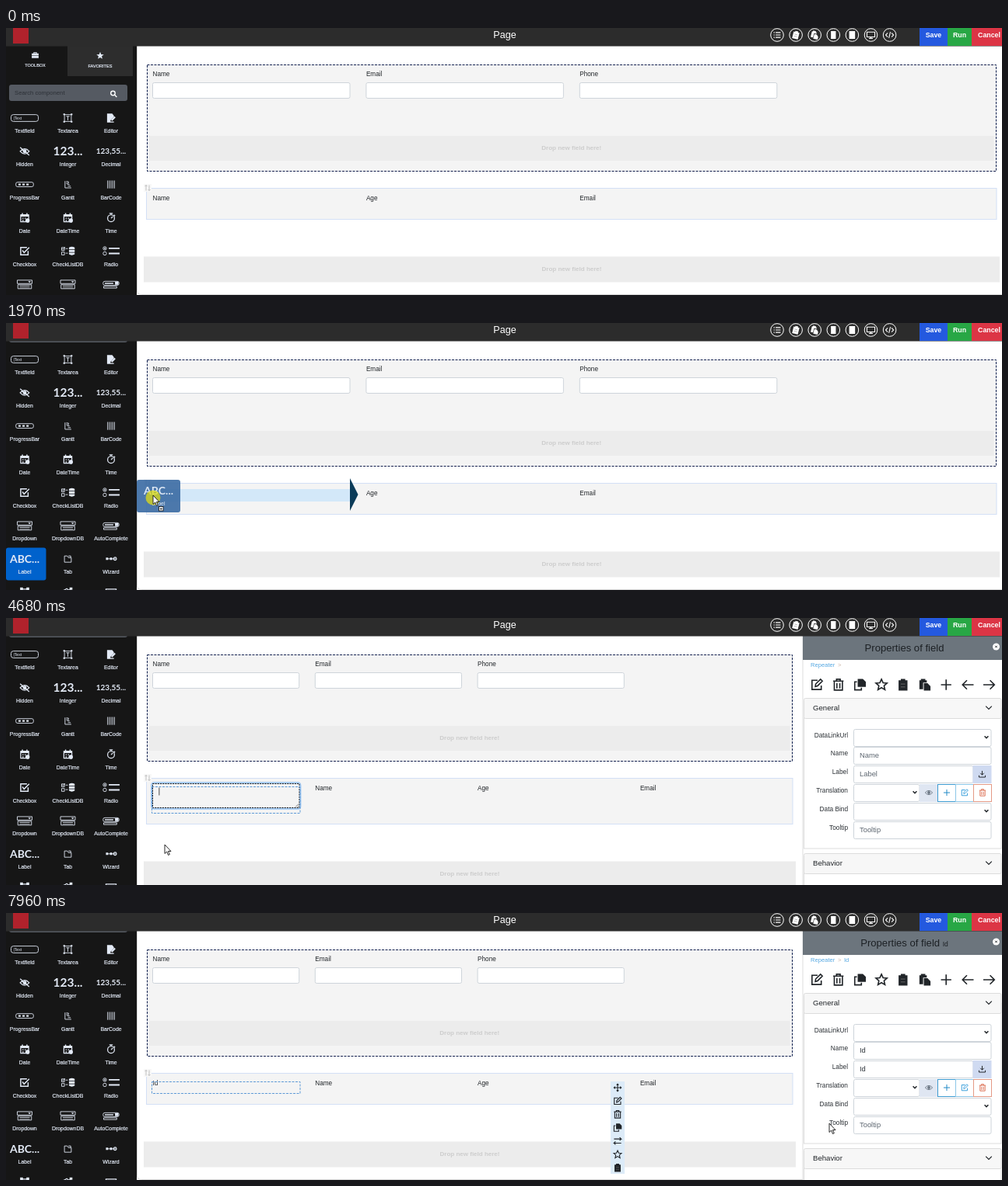
Recreate the animation shown at these times as an HTML page. Size 1280 by 344 pixels, loop 8000 ms.

```html
<!DOCTYPE html>
<html lang="en">
<head>
<meta charset="utf-8">
<title>Form builder</title>
<style>
html, body { margin: 0; width: 100%; height: 100%; overflow: hidden; background: #fff; }
svg { display: block; width: 1280px; height: 344px; font-family: "Liberation Sans", Arial, sans-serif; }
.num { font-family: Lato, sans-serif; font-weight: 700; }
</style>
</head>
<body>
<svg id="stage" viewBox="0 0 1280 344" xmlns="http://www.w3.org/2000/svg"></svg>
<script>
const LOOP = 8000;
const stage = document.getElementById('stage');
const INK = '#212529', PALE = '#e3eaf6';

const text = (x, y, s, size, fill = INK, more = '') =>
  `<text x="${x}" y="${y + size * 0.36}" font-size="${size}" fill="${fill}" ${more}>${s}</text>`;
const MID = 'text-anchor="middle"', END = 'text-anchor="end"', BOLD = 'font-weight="700"';
const FIRM = `stroke="${PALE}" stroke-width=".2"`;
// box given by its edges
const box = (x, y, r, b, fill, more = '') =>
  `<rect x="${x}" y="${y}" width="${r - x}" height="${b - y}" fill="${fill}" ${more}/>`;
const path = (d, more = '') => `<path d="${d}" ${more}/>`;
const solid = d => path(d, 'fill="currentColor" stroke="none"');
const THIN = 'stroke-width="1.200"';

const cal = path('M-7-5H7V7H-7Z') + solid('M-7-6H7V-2H-7ZM-5-8h2v3h-2ZM3-8h2v3H3ZM-4 0h2v2h-2ZM0 0h2v2H0ZM-4 4h2v2h-2Z')
  + '<circle cx="5" cy="5" r="3" fill="currentColor"/>';
const select = path('M-13-7H13V-1H-13ZM-12 1H12V8H-12Z', THIN) + solid('M6-5h5L8.500-2.500ZM-9 3H9v1H-9ZM-9 5.500H9v.8H-9Z');
const ICONS = {
  edit: path('M1-6H-6.500V6.500H6V1M-2 2.500-1.500-1 5-7.500 7.500-5 1 1.500Z'),
  trash: path('M-7-5H7M-5.500-5V7.200H5.500V-5M-2.500-5V-7.500H2.500V-5M-2-2V5M2-2V5'),
  copy: solid('M-3-8H4L8-4V3H-3Z') + path('M-4-4H-7V7H2V4'),
  star: path('M0-7.500 2.200-2.700 7.500-2.200 3.500 1.400 4.700 6.800 0 4-4.700 6.800-3.500 1.400-7.500-2.200-2.200-2.700Z'),
  clip: solid('M-6-6H-3V-8H3V-6H6V8H-6Z') + path('M-3-1H3M-3 3H3', 'stroke="#777" stroke-width=".8"'),
  paste: solid('M-7-6H-5V-8H1V-6H3V-3H-2V6H-7ZM-1-2H4L8 2V8H-1Z'),
  plus: path('M-7 0H7M0-7V7'),
  left: path('M8 0H-7M-1-6-7 0-1 6'),
  right: path('M-8 0H7M1-6 7 0 1 6'),
  swap: path('M-7-4H7L4-7M7-4 4-1M7 4H-7L-4 1M-7 4-4 7'),
  move: path('M-7 0H7M0-7V7M-2-5 0-7 2-5M-2 5 0 7 2 5M-5-2-7 0-5 2M5-2 7 0 5 2'),
  list: path('M-7-5h2M-7 0h2M-7 5h2M-3-5H7M-3 0H7M-3 5H7'),
  phone: solid('M-5-8H5V8H-5Z'),
  tablet: solid('M-6-8H6V8H-6Z'),
  desktop: path('M-8-6H8V4H-8ZM-4 7H4M0 4V7'),
  code: path('M-4-4-8 0-4 4M4-4 8 0 4 4M1.500-6-1.500 6'),
  eye: path('M-8 0Q0-9 8 0Q0 9-8 0Z') + '<circle r="2.500" fill="currentColor"/>',
  down: path('M-4-2 0 2 4-2'),
  save: path('M0-7V2M-4-2 0 2 4-2M-7 3V7H7V3'),
  search: '<circle cx="-1" cy="-1" r="5"/>' + path('M3 3 8 8'),
  case: solid('M-8-4H8V1H-8ZM-8 2H8V7H-8ZM-4-7H4V-4H2V-5H-2V-4H-4Z'),
  fav: solid('M0-8 2.200-2.700 8-2.200 3.500 1.400 4.700 7 0 4-4.700 7-3.500 1.400-8-2.200-2.200-2.700Z'),
  field: `<rect x="-24" y="-6" width="48" height="12" rx="4" ${THIN}/>` + text(-20, 0, '|Text', 7, PALE, 'stroke="none"'),
  area: path('M-6-6H6V6H-6ZM-3-3H3M0-3V4', THIN) + solid('M-8-8h3v3h-3ZM5-8h3v3H5ZM-8 5h3v3h-3ZM5 5h3v3H5Z'),
  doc: solid('M-7-8H2L5-4V-2L-1 4V6H5V8H-7Z') + path('M1 4 7-2', 'stroke-width="3"'),
  hidden: path('M-8 0Q0-9 8 0Q0 9-8 0ZM-8-7 8 7') + '<circle r="2.500" fill="currentColor"/>',
  bar: `<rect x="-15.500" y="-4" width="31" height="8" rx="3" ${THIN}/>` + solid('M-11-1.500h4v3h-4ZM-4-1.500h4v3h-4ZM3-1.500h4v3H3Z'),
  gantt: path('M-5-6V6H6M-3-5H1V-2H-3M-1 0H3M0 3H5', THIN),
  stripes: path('M-6-7V7M-3-7V7M0-7V7M3-7V7M6-7V7', THIN),
  cal,
  watch: '<circle cy="1" r="6"/>' + path('M-3-7.500H3M0-7V-5M0 1 3-2M5-5 7-3'),
  check: path('M6 0V7H-7V-6H4M-4-1-1 3 8-6', 'stroke-width="2"'),
  checkdb: path('M-11-6h5v5h-5ZM-11 2h5v5h-5ZM-10-4l2 1 3-4M-4-4H0M-4 4H0', THIN) + solid('M2-6Q7-9 12-6V-3H2ZM2-2H12V2H2ZM2 3H12V6Q7 9 2 6Z'),
  radio: `<g ${THIN}><circle cx="-11" cy="-4.500" r="3"/><circle cx="-11" cy="4.500" r="3"/><circle cx="-11" cy="-4.500" r="1"/></g>` + path('M-4-4.500H15M-4 4.500H15', 'stroke-width="2.500"'),
  select,
  auto: `<rect x="-14" y="-5" width="28" height="7" rx="3" ${THIN}/>` + path('M-13 4H10V7H-13Z', THIN) + solid('M-11-2.500H4v2H-11ZM7-4h6v5H7Z'),
  tab: path('M-6-5H-1L1-2H6V6H-6ZM1-5H5V-2', THIN),
  wizard: path('M-8 0H8', THIN) + solid('M-9-2h4v4h-4ZM-2-2h4v4h-4Z') + '<circle cx="7" r="2.500"/>',
  nodes: path('M-5-5H5V5H-5Z') + solid('M-8-8h5v5h-5ZM3-8h5v5H3Z'),
  line: path('M-7-3-2-6 2-3 7-7') + solid('M-8-4h4v4h-4ZM3-8h5v4H3Z'),
  frame: path('M-9-5H9V8H-9ZM-5 4-2 0 1 3 4-1 7 4')
};
const icon = (name, x, y, k = 1, c = INK, w = 1.7, turn = 0) =>
  `<g transform="translate(${x} ${y}) rotate(${turn}) scale(${k})" fill="none" stroke="${c}" color="${c}" stroke-width="${w}">${ICONS[name]}</g>`;

// sidebar
const COLS = [24, 79.5, 135], EDGES = [[0, 51.5], [53, 106], [108, 162.5]], PITCH = 42.8;
const TOOLS = [
  ['Textfield', 'field'], ['Textarea', 'area'], ['Editor', 'doc'],
  ['Hidden', 'hidden'], ['Integer', '123...', 15.5], ['Decimal', '123,55...', 10],
  ['ProgressBar', 'bar'], ['Gantt', 'gantt'], ['BarCode', 'stripes'],
  ['Date', 'cal'], ['DateTime', 'cal'], ['Time', 'watch'],
  ['Checkbox', 'check'], ['CheckListDB', 'checkdb'], ['Radio', 'radio'],
  ['Dropdown', 'select'], ['DropdownDB', 'select'], ['AutoComplete', 'auto'],
  ['Label', 'ABC...', 14], ['Tab', 'tab'], ['Wizard', 'wizard'],
  ['', 'nodes'], ['', 'line'], ['', 'frame']
];
const tile = (i, fill, id) => {
  const [a, b] = EDGES[i % 3], y = 101.600 + PITCH * Math.floor(i / 3);
  return box(a, y, b, y + 42, fill, `rx="3" id="${id}" opacity="0"`);
};
// tile index, then [time, strength]
const HOVERS = [
  [8, [[640, 0], [740, 1], [960, 1], [1100, 0]]],
  [11, [[880, 0], [960, .4], [1080, 0]]],
  [14, [[1000, 0], [1060, 1], [1130, 1], [1260, 0]]],
  [13, [[1100, 0], [1160, 1], [1230, 1], [1360, 0]]],
  [16, [[1220, 0], [1290, 1], [1370, 1], [1500, 0]]],
  [18, [[1420, 0], [1520, 1], [1700, 1], [1740, 0]]]
];
const tool = ([name, art, size], i) => {
  const x = COLS[i % 3], y = 116 + PITCH * Math.floor(i / 3);
  return (size ? text(x, y, art, size, PALE, MID + ' class="num"') : icon(art, x, y, .73, PALE))
    + text(x, y + 17, name, 6.9, PALE, MID + ' ' + FIRM);
};
const sidebar = box(0, 23, 168, 344, '#161616') + '<g id="tools">'
  + box(79, 23, 163, 62, '#2d2d2d')
  + icon('case', 37.5, 35, .55, PALE) + text(37.5, 48.500, 'TOOLBOX', 5.5, PALE, MID + ' ' + FIRM)
  + icon('fav', 121, 35.500, .6, PALE) + text(121, 49, 'FAVORITES', 5.6, PALE, MID + ' ' + FIRM)
  + box(4, 73, 156, 94, '#555a62', 'rx="3"') + text(11, 83.500, 'Search component', 7.7, '#2d3137')
  + icon('search', 138, 84.500, .55, '#fff', 2.6)
  + HOVERS.map(([i], n) => tile(i, '#2e3034', 'hover' + n)).join('') + tile(18, '#0062cc', 'picked')
  + TOOLS.map(tool).join('') + '</g>';

// header
const HEAD = ['list', 'clip', 'paste', 'phone', 'tablet', 'desktop', 'code'];
const header = box(0, 0, 1280, 23.5, '#2c2c2c') + box(9, 0, 29, 20, '#b0222c')
  + text(641, 8, 'Page', 12.6, '#fff', MID)
  + HEAD.map((n, i) => `<circle cx="${991 + i * 24.1}" cy="9" r="8.300" fill="none" stroke="#fff"/>`
    + icon(n, 991 + i * 24.1, 9, .63, '#fff', 1.7, n === 'clip' || n === 'paste' ? 14 : 0)).join('')
  + [['Save', 1174, 1210, '#2459df'], ['Run', 1210, 1241, '#28a745'], ['Cancel', 1241, 1284, '#dc3545']]
    .map(([s, a, b, c]) => box(a, 0, b, 23, c) + text((a + b) / 2 + (s === 'Cancel' ? 1 : 0), 8.500, s, 8.8, '#fff', MID + ' ' + BOLD)).join('');

const dashed = (x, y, r, b, c, fill = 'none', dash = '3 1.500') =>
  box(x, y, r, b, fill, `stroke="${c}" stroke-dasharray="${dash}"`);
const dropZone = (x, y, r, b, fill) =>
  box(x, y, r, b, fill) + text((x + r) / 2, (y + b) / 2 - .5, 'Drop new field here!', 8, '#cdcdcd', MID + ' ' + BOLD);
const handle = y => icon('swap', 182, y, .5, '#b5b5b5', 1.7, 90);

const BAR = ['move', 'edit', 'trash', 'copy', 'swap', 'star', 'clip', 'paste'];
const toolbar = (x, n) => box(x - 9, 217, x + 9, n < 8 ? 336 : 344, '#dcebf8')
  + BAR.slice(0, n).map((k, i) => icon(k, x, 225 + i * 17.2, .66)).join('');

function editor(x, y, r, b, s, glow) {
  const size = 8.2, tx = x + 8, ty = y + 10;
  const w = { Label: 21, L: 5, I: 3, Id: 7.500 }[s] || 0;
  const wave = s === 'Label' ? path(`M${tx} 244.500` + 'l1.500-1.500 1.500 1.500'.repeat(7), 'fill="none" stroke="#d33" stroke-width=".7"') : '';
  return (glow ? box(x - 1, y - 1, r + 1, b + 1, 'none', 'rx="3" stroke="#a9cdf3" stroke-width="3"') : '')
    + dashed(x, y, r, b, '#111', '#f4f4f4', '2 1.200') + text(tx, ty, s, size) + wave
    + box(tx + w, ty - 5, tx + w + .8, ty + 5, '#222')
    + path(`M${r - 5} ${b - 1}l4-4M${r - 2.500} ${b - 1}l1.500-1.500`, 'stroke="#666" stroke-width=".8"');
}

// mode -> bottom of the repeater row
const BOTTOM = { wide: 247, drop: 283, edit: 283, top: 266, mid: 270, small: 275, done: 247 };
function page(mode, s) {
  const narrow = mode !== 'wide' && mode !== 'drop';
  const R = narrow ? 1011 : 1273, step = narrow ? 208.8 : 274.4, w = narrow ? 188.2 : 253.5;
  const b = BOTTOM[mode], d = b + 47.500;
  const names = mode === 'wide' ? ['Name', 'Age', 'Email'] : [mode === 'drop' ? 'Label' : '', 'Name', 'Age', 'Email'];
  const left = i => 188.5 + i * step;
  let h = box(168, 23, 1280, 344, '#fff')
    + box(168.500, 10, R + 40, d + 49, 'none', 'rx="5" stroke="#d4d4d4"')
    + dashed(181.500, 47.500, R - .5, 184.500, '#10204f', '#f4f4f4')
    + ['Name', 'Email', 'Phone'].map((n, i) => text(left(i), 59, n, 8.2)
      + box(left(i), 70.5, left(i) + w, 90.5, '#fff', 'rx="2" stroke="#ced4da"')).join('')
    + dropZone(184, 139, R - 3.5, 171, '#ececec')
    + box(180.500, 206.500, R, b - .5, '#f4f4f4', 'stroke="#d3e0f6"')
    + box(177, 201, 187, 211, '#f8f8f8') + handle(206)
    + names.map((n, i) => text(left(i), 219, n, 8.2)).join('')
    + dropZone(177, d, R + 4, d + 33, '#ececec');
  const frame = y => dashed(187.5, 217.5, 378, y, '#5f9ad6');
  if (mode === 'edit') h += frame(268.5) + text(188.5, 219, s, 8.2) + editor(188.5, 230.5, 377, 262.5, s);
  if (mode === 'top') h += editor(188.5, 213.5, 377, 244.5, s, 1) + frame(251.500);
  if (mode === 'mid') h += frame(256.5) + editor(195.5, 213.5, 247, 249.5, s, 1);
  if (mode === 'small') h += frame(261.5) + text(188.5, 247, s, 8.2) + editor(195.5, 213.5, 247, 249.5, s, 1);
  if (mode === 'done') h += text(188.5, 219, s, 8.2) + frame(232.5);
  return h + (narrow ? panel(s) : '');
}

const FIELDS = ['DataLinkUrl', 'Name', 'Label', 'Translation', 'Data Bind', 'Tooltip'];
const ACTIONS = ['edit', 'trash', 'copy', 'star', 'clip', 'paste', 'plus', 'left', 'right'];
function panel(s) {
  const rim = 'stroke="#ced4da" rx="2"', y = i => Math.round(142.5 + i * 23.9) + .5;
  const section = (top, name) => box(1025.500, top, 1279, top + 26, '#f7f7f7', 'rx="2" stroke="#dcdcdc"')
    + text(1037, top + 12, name, 9.6) + icon('down', 1263, top + 12, .95, INK, 1.3);
  const value = (i, v, hint) => text(1097, y(i) + 10.5, v || hint, 9.4, v ? '#343a40' : '#5d6670');
  const arrow = (x, i) => icon('down', x, y(i) + 10, .6, INK, 2.6);
  const button = (x, i, fill, line, art, c) => box(x, y(i), x + 23, y(i) + 22, fill, `stroke="${line}"`) + icon(art, x + 11.500, y(i) + 10.5, .58, c);
  return box(1024, 23, 1280, 344, '#fff') + box(1023.500, 23, 1024.500, 344, '#ddd')
    + box(1024, 23, 1280, 54, '#6c757d')
    + text(1154.500, 38, `Properties of field${s ? ` <tspan font-size="8.500">${s}</tspan>` : ''}`, 13.1, '#1d2125', MID)
    + '<circle cx="1272.500" cy="37" r="4.500" fill="#fff"/>' + icon('plus', 1272.500, 37, .25, INK, 3.5, 45)
    + text(1034, 60, 'Repeater', 7.6, '#55a8e2') + text(1069, 60, '&gt;', 7.6, '#c9b3a5') + text(1077, 60, s, 7.6, '#55a8e2')
    + ACTIONS.map((n, i) => icon(n, 1042 + i * 27.7, 86, .95)).join('')
    + box(1025.500, 116, 1279, 297, '#fff', 'stroke="#dcdcdc"') + section(103.5, 'General')
    + box(1025.500, 316, 1279, 350, '#fff', 'stroke="#dcdcdc"') + section(303.5, 'Behavior')
    + FIELDS.map((n, i) => text(1082, y(i) + 8, n, 8.3, '#2b3035', END)
      + box(1089.5, y(i), [1266, 1266, 1243, 1174, 1266, 1266][i], y(i) + 22, '#fff', rim)).join('')
    + arrow(1260, 0) + arrow(1168, 3) + arrow(1260, 4)
    + value(1, s, 'Name') + value(2, s, 'Label') + value(5, '', 'Tooltip')
    + button(1243, 2, '#cfdaf1', '#cfdaf1', 'save', INK)
    + button(1174.500, 3, '#dfe6f2', '#dfe6f2', 'eye', '#6f7a88')
    + button(1197.5, 3, '#fff', '#3d9ad0', 'plus', '#2089c7')
    + button(1220.5, 3, '#fff', '#8cc7e8', 'edit', '#3ba0dc')
    + button(1243.5, 3, '#fff', '#e49a86', 'trash', '#dd7358');
}

const CURSORS = {
  arrow: path('M0 0V11.500L2.700 9 4.500 13.500 6.300 12.700 4.500 8.500H8Z', 'fill="#fff" stroke="#111" stroke-width=".9"'),
  hand: path('M-1.500 1.500q0-1.500 1.300-1.500t1.300 1.500V6l4.500 1.300q1.500.500 1.300 2.200L6 16H-.5L-4.800 10q-.8-1.600.8-2l2.500 1.500Z', 'fill="#fff" stroke="#222" stroke-width=".8"'),
  beam: path('M-2-5Q0-5 0-4Q0-5 2-5M0-4V4M-2 5Q0 5 0 4Q0 5 2 5', 'fill="none" stroke="#111"')
};
const ghost = box(-21, -20, 35, 22, '#3a6ba3', 'rx="3" opacity=".9"')
  + text(7, -6, 'ABC...', 14, '#dbe6f3', MID + ' class="num"') + text(7, 11, 'Label', 6.9, '#e6eef8', MID)
  + '<circle cy="3" r="9.500" fill="#e0dc14" opacity=".75"/>' + CURSORS.arrow
  + box(7.5, 14.5, 13, 20, '#fff', 'stroke="#222" stroke-width=".9"') + path('M10.200 16v3M8.700 17.300h3', 'stroke="#222" stroke-width=".8"');

stage.innerHTML = `<g id="page"></g><g id="grip">${handle(47)}</g><g id="mark"></g>
  <g id="bar1">${toolbar(357.5, 8)}</g><g id="bar2">${toolbar(786, 7)}</g>${sidebar}${header}<g id="cursor"></g>`;
const $ = id => document.getElementById(id);
const cache = {};
const fill = (id, key, make) => {
  if (cache[id] !== key) { cache[id] = key; $(id).innerHTML = make(); }
};

const at = (track, t, k = 1) => {
  const n = track.findIndex(p => p[0] > t);
  if (n === 0) return track[0][k];
  if (n < 0) return track[track.length - 1][k];
  const a = track[n - 1], b = track[n];
  return a[k] + (b[k] - a[k]) * (t - a[0]) / (b[0] - a[0]);
};

const STEPS = [
  [0, 'wide', ''], [2800, 'drop', ''], [2940, 'edit', 'Label'], [4080, 'edit', 'L'], [4610, 'edit', ''],
  [4680, 'top', ''], [4940, 'mid', ''], [5200, 'small', 'I'], [5530, 'small', 'Id'], [7090, 'done', 'Id']
];
const MOUSE = [
  [70, 560, 314], [250, 480, 260], [400, 340, 150], [560, 190, 150], [700, 116, 205], [820, 114.5, 232.500],
  [1030, 114.5, 232.500], [1300, 80, 275], [1630, 21, 309], [1700, 21, 309], [1970, 189, 222], [2230, 189, 222],
  [2440, 181, 222], [2800, 181, 222], [2940, 188, 234], [3080, 190, 240], [3200, 191, 242], [3480, 204, 292],
  [6130, 204, 292], [6280, 360, 318], [6410, 514, 311], [6610, 514, 311], [6890, 523, 294], [7090, 523, 294],
  [7300, 600, 252], [7500, 700, 236], [7600, 770, 244], [7830, 915, 286], [7960, 1058, 271]
];
const SCROLL = [[820, 0], [960, 61], [1060, 69]];
const BAR1 = [[2940, 0], [3000, .45], [3100, .45], [3480, 0]];
const PICKED = [[2940, 1], [3080, .9], [3400, 0]];

function draw(t) {
  const [, mode, s] = STEPS.filter(p => p[0] <= t).pop();
  fill('page', mode + s, () => page(mode, s));

  const x = at(MOUSE, t, 1), y = at(MOUSE, t, 2);
  const drag = t >= 1700 && t < 2800;
  const kind = t < 70 ? '' : drag ? 'drag' : x < 168 ? 'hand' : t > 2900 && t < 3260 ? 'beam' : 'arrow';
  fill('cursor', kind, () => kind === 'drag' ? ghost : CURSORS[kind] || '');
  $('cursor').setAttribute('transform', `translate(${x} ${y})`);

  const side = !drag || x < 170 ? '' : t < 2300 ? 'right' : 'left';
  fill('mark', side, () => side ? box(187, 214, 442, 230, '#d3e8f9')
    + path(side === 'right' ? 'M442 200 452.500 221 442 242Z' : 'M187 200 176.500 221 187 242Z', 'fill="#0b3b58"') : '');

  $('tools').setAttribute('transform', `translate(0 ${-at(SCROLL, t)})`);
  HOVERS.forEach(([, track], n) => $('hover' + n).setAttribute('opacity', at(track, t)));
  $('picked').setAttribute('opacity', t < 1700 ? 0 : at(PICKED, t));
  $('grip').setAttribute('opacity', t > 360 && t < 580 ? 1 : 0);
  $('bar1').setAttribute('opacity', at(BAR1, t));
  $('bar2').setAttribute('opacity', t >= 7450 ? 1 : 0);
}

const start = performance.now();
function tick() {
  draw((performance.now() - start) % LOOP);
  requestAnimationFrame(tick);
}
tick();
</script>
</body>
</html>
```
